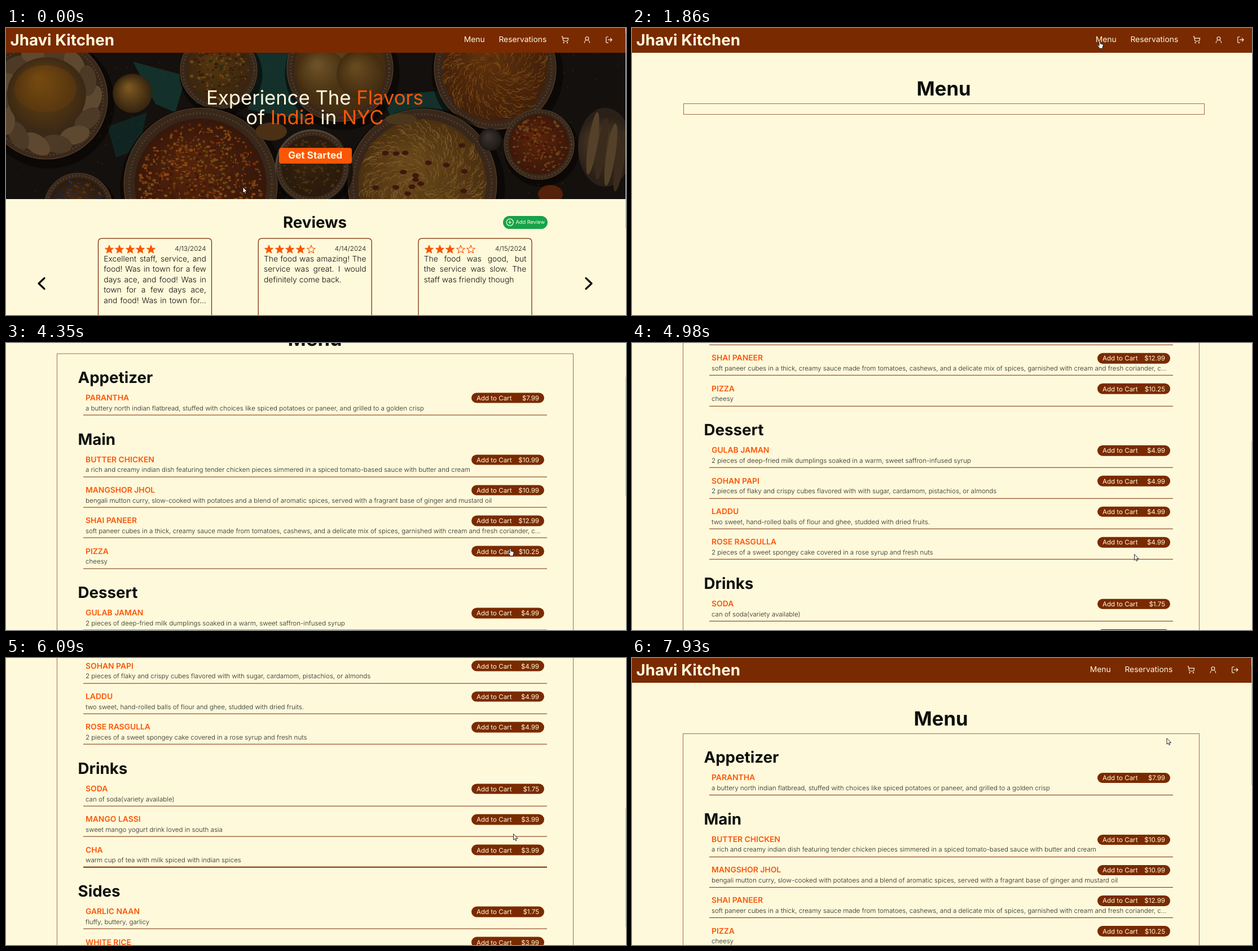
Write an HTML page with a canvas that moves like this. It is 1099 px wide and 510 px high and loops after 8000 ms.

```html
<!DOCTYPE html>
<html lang="en">
<head>
<meta charset="utf-8">
<title>Restaurant menu</title>
<style>
  :root { --cream: #fff9db; --brown: #7a2a00; --orange: #fb5607; --ink: #0c0f0a; --soft: #262924; }
  html, body { margin: 0; width: 100%; height: 100%; overflow: hidden; background: var(--cream); }
  #stage { position: relative; width: 1099px; height: 510px; overflow: hidden; font-family: Inter, sans-serif; color: var(--ink); text-rendering: geometricPrecision; }
  #stage div, #stage p, #stage svg, canvas { position: absolute; }
  svg { overflow: visible; fill: none; stroke-linecap: round; stroke-linejoin: round; }
  .page { inset: 0; }
  .t { white-space: pre; line-height: 40px; }
  .mid { transform: translateX(-50%); }
  .end { transform: translateX(-100%); }
  .bar { left: 0; top: 0; height: 44px; background: var(--brown); }
  .frame { top: 134px; border: 1px solid #7a2a00b0; box-sizing: border-box; }
  .rule { left: 137px; width: 821.5px; height: 1.3px; background: var(--brown); }
  .pill { left: 824.5px; width: 129.5px; height: 18.5px; border-radius: 10px; background: var(--brown); }
  .review { margin: 0; top: 401.8px; width: 181.5px; font-size: 13.86px; font-weight: 300; line-height: 18.48px; text-align-last: justify; white-space: nowrap; }
  .review span { display: block; }
  .review .left { text-align-last: left; }
  #track { left: 1098px; top: 0; width: 1px; height: 510px; background: #f1f1f1; }
  #thumb { left: 0; top: 0; width: 1px; background: #c1c1c1; }
</style>
</head>
<body>
<div id="stage">
  <div class="page" id="home"></div>
  <div class="page" id="loading"></div>
  <div class="page" id="menu"></div>
  <div id="track"><div id="thumb"></div></div>
  <svg id="cursor" width="1" height="1" style="left:0;top:0" stroke="#111" stroke-width=".9">
    <path id="arrow" fill="#fff" d="M0 0V10.2L2.4 8.1 4 11.6 5.6 10.9 4.1 7.5H7.2Z"/>
    <path id="hand" fill="#fff" d="M-1.1 1Q0-.8 1.1 1V5L2.7 5.2 4.2 5.6 5.6 6.2Q6.3 6.6 6.2 8L5 11.5V13.5H-.8V12L-3.6 8.4Q-3.7 6.9-2.3 7.3L-1.1 8.6Z"/>
  </svg>
</div>
<script>
const $ = id => document.getElementById(id);
const CREAM = 'var(--cream)', ORANGE = 'var(--orange)', INK = 'var(--ink)', SOFT = 'var(--soft)';

// y is the middle of the capital letters
const text = (x, y, size, weight, color, str, align = '') =>
  `<div class="t ${align}" style="left:${x}px;top:${y - 20}px;font-size:${size}px;font-weight:${weight};color:${color}">${str}</div>`;

const icon = (x, y, size, body, color = CREAM, width = 2) =>
  `<svg style="left:${x - size / 2}px;top:${y - size / 2}px" width="${size}" height="${size}" viewBox="0 0 24 24" stroke="${color}" stroke-width="${width}">${body}</svg>`;

const CART = '<circle cx="8" cy="21" r="1"/><circle cx="19" cy="21" r="1"/><path d="M2 2h2l2.7 12.4a2 2 0 0 0 2 1.6h9.7a2 2 0 0 0 2-1.6L22 7H5.1"/>';
const USER = '<circle cx="12" cy="8" r="5"/><path d="M20 21a8 8 0 0 0-16 0"/>';
const EXIT = '<path d="M9 21H5a2 2 0 0 1-2-2V5a2 2 0 0 1 2-2h4M16 17l5-5-5-5M21 12H9"/>';
const PLUS = '<circle cx="12" cy="12" r="10"/><path d="M8 12h8M12 8v8"/>';

const header = (width, shift) =>
  `<div class="bar" style="width:${width}px"></div>` +
  text(7.5, 21, 27.7, 700, CREAM, 'Jhavi Kitchen') +
  text(811.7 + shift, 20.5, 13.86, 400, CREAM, 'Menu') +
  text(873.4 + shift, 20.5, 13.86, 400, CREAM, 'Reservations') +
  [CART, USER, EXIT].map((body, i) => icon(990.5 + 39 * i + shift, 20.5, 13.9, body)).join('');

// Home page
const starPoints = Array.from({ length: 10 }, (_, i) => {
  const r = i % 2 ? 5 : 11.5, a = i * Math.PI / 5;
  return `${(12 + r * Math.sin(a)).toFixed(1)},${(13 - r * Math.cos(a)).toFixed(1)}`;
}).join(' ');

const card = (x, stars, date, lines, lastClass) =>
  `<svg style="left:0;top:0" width="1" height="1"><rect x="${x + .5}" y="373.8" width="201" height="180" rx="6" stroke="var(--brown)" stroke-width="1.25"/></svg>` +
  Array.from({ length: 5 }, (_, i) => icon(x + 19.5 + 18.6 * i, 392.7, 16,
    `<polygon points="${starPoints}" fill="${i < stars ? ORANGE : 'none'}"/>`, ORANGE, 1.7)).join('') +
  text(x + 191.5, 391.7, 11.55, 300, INK, date, 'end') +
  `<p class="review" style="left:${x + 10.3}px">` +
  lines.map((line, i) => `<span class="${i === lines.length - 1 ? lastClass : ''}">${line}</span>`).join('') + '</p>';

const accent = str => `<span style="color:${ORANGE}">${str}</span>`;

$('home').innerHTML = header(1098, 0) +
  '<canvas id="hero" width="1098" height="260" style="left:0;top:44px"></canvas>' +
  text(547.5, 123.7, 34.65, 400, CREAM, `Experience The ${accent('Flavors')}`, 'mid') +
  text(547.5, 158.5, 34.65, 400, CREAM, `of ${accent('India')} in ${accent('NYC')}`, 'mid') +
  `<div style="left:483.5px;top:213px;width:129.5px;height:28px;border-radius:4px;background:${ORANGE}"></div>` +
  text(548, 227, 17.3, 700, CREAM, 'Get Started', 'mid') +
  text(547.5, 345, 27.7, 700, INK, 'Reviews', 'mid') +
  '<div style="left:881px;top:334px;width:79px;height:23px;border-radius:12px;background:#16a34a"></div>' +
  icon(893, 345.5, 14.5, PLUS) + text(903.5, 345.5, 9.24, 400, CREAM, 'Add Review') +
  card(163, 5, '4/13/2024', ['Excellent staff, service, and', 'food! Was in town for a few', 'days ace, and food! Was in',
    'town for a few days ace,', 'and food! Was in town for…'], '') +
  card(446.7, 4, '4/14/2024', ['The food was amazing! The', 'service was great. I would', 'definitely come back.'], 'left') +
  card(730.5, 3, '4/15/2024', ['The food was good, but', 'the service was slow. The', 'staff was friendly though'], 'left') +
  icon(62.5, 454, 24, '<path d="M17 2.5L7 12 17 21.5"/>', INK, 3.3) +
  icon(1033, 454, 24, '<path d="M7 2.5L17 12 7 21.5"/>', INK, 3.3);

function paintHero() {
  const c = $('hero').getContext('2d');
  let seed = 7;
  const rnd = () => (seed = seed * 16807 % 2147483647) / 2147483647;
  const disc = (x, y, r, color, ry = r, turn = 0) => {
    c.fillStyle = color;
    c.beginPath();
    c.ellipse(x, y, r, ry, turn, 0, 7);
    c.fill();
  };
  const glow = (x, y, r, inner, outer) => {
    const g = c.createRadialGradient(x - r * .2, y - r * .3, r * .1, x, y, r);
    g.addColorStop(0, inner);
    g.addColorStop(1, outer);
    return g;
  };
  const patch = (color, ...p) => {
    c.fillStyle = color;
    c.beginPath();
    for (let i = 0; i < p.length; i += 2) c.lineTo(p[i], p[i + 1]);
    c.fill();
  };
  const folds = (x, y, r, count) => {
    for (let i = 0; i < count; i++) {
      const a = i * 6.283 / count;
      disc(x + r * Math.cos(a), y + r * Math.sin(a), r * .2, i % 2 ? '#4d3a26' : '#5e4930', r * .34, a + .4);
    }
  };
  const bowl = (x, y, r, inner, outer, specks = [], strands = false) => {
    disc(x + 4, y + 8, r * 1.08, 'rgba(5,4,3,.6)');
    disc(x, y, r, glow(x, y, r, '#2a1d14', '#3a281b'));
    c.strokeStyle = '#53402b';
    c.lineWidth = 1.2;
    c.beginPath();
    c.arc(x, y, r, 0, 7);
    c.stroke();
    c.setLineDash([2, 4]);
    c.lineWidth = 3;
    c.beginPath();
    c.arc(x, y, r * .93, 0, 7);
    c.stroke();
    c.setLineDash([]);
    disc(x, y, r * .86, glow(x, y, r * .86, inner, outer));
    for (let i = 0; specks.length && i < r * r / 20; i++) {
      const a = rnd() * 6.3, d = Math.sqrt(rnd()) * r * .8;
      const px = x + d * Math.cos(a), py = y + d * Math.sin(a), color = specks[i % specks.length];
      if (strands) {
        c.strokeStyle = color;
        c.lineWidth = 1;
        c.beginPath();
        c.arc(px, py, 4 + rnd() * 7, a, a + 1.8);
        c.stroke();
      } else disc(px, py, 1 + rnd() * 2.6, color, 1 + rnd() * 1.8);
    }
  };
  c.fillStyle = '#14100d';
  c.fillRect(0, 0, 1098, 260);
  c.translate(0, -44);
  patch('#14302b', 225, 60, 320, 85, 300, 150, 265, 135);
  patch('#14302b', 430, 44, 510, 44, 535, 165, 430, 145);
  patch('#14302b', 665, 120, 790, 110, 780, 180, 690, 175);
  patch('#102521', 180, 175, 250, 150, 235, 215, 195, 230);
  bowl(72, 125, 108, '#4c3215', '#34261a');
  folds(72, 128, 80, 14);
  disc(72, 118, 70, glow(72, 118, 70, '#68430f', '#3a2815'), 66);
  disc(70, 108, 55, glow(70, 108, 55, '#73490f', '#54340f'), 42);
  disc(224, 116, 35, glow(224, 116, 35, '#7a5520', '#33230f'));
  bowl(377, 75, 68, '#54350f', '#3a2410', ['#6b4715', '#3a1c0a', '#2f2d12']);
  bowl(592, 72, 94, '#5d4119', '#422b11');
  disc(560, 78, 44, glow(560, 78, 44, '#6c5028', '#46300f'), 40);
  disc(628, 82, 42, glow(628, 82, 42, '#66491f', '#422c10'), 44);
  bowl(867, 72, 108, '#5d310c', '#40200a', ['#754110', '#54260a', '#85551a'], true);
  bowl(345, 278, 136, '#52230a', '#35170b', ['#713209', '#6b4617', '#421508', '#8a4712']);
  bowl(738, 276, 132, '#674719', '#4a3010', ['#795726', '#856332', '#5a3212'], true);
  for (let i = 0; i < 16; i++) disc(655 + rnd() * 165, 205 + rnd() * 90, 6, '#3f160d', 4);
  disc(543, 246, 66, '#4b443a');
  bowl(543, 246, 63, '#39240f', '#281a0d', ['#49300f', '#2d1c0b']);
  bowl(945, 207, 62, '#5a240b', '#3b180a', ['#733411', '#451409', '#67461a']);
  bowl(128, 318, 60, '#40270f', '#2a1b10', ['#553311', '#1f2346']);
  disc(858, 198, 20, glow(858, 198, 20, '#3b342e', '#1d1916'));
  disc(700, 162, 28, '#4a371b', 10);
  disc(470, 184, 28, '#4b3015', 16);
  disc(1062, 212, 48, glow(1062, 212, 55, '#4c3a25', '#2a2018'), 70);
  for (let i = 0; i < 4; i++) disc(1040 + 16 * i, 205 + 10 * i, 8, i % 2 ? '#3a2b1c' : '#554129', 56, .15);
  disc(965, 295, 22, '#54210a', 16);
  for (let i = 0; i < 140; i++) disc(rnd() * 1098, 44 + rnd() * 260, 1.5, 'rgba(90,65,35,.35)', 1);
}
paintHero();

// Menu page
const sections = [
  ['Appetizer', ['PARANTHA', '7.99', 'a buttery north indian flatbread, stuffed with choices like spiced potatoes or paneer, and grilled to a golden crisp']],
  ['Main',
    ['BUTTER CHICKEN', '10.99', 'a rich and creamy indian dish featuring tender chicken pieces simmered in a spiced tomato-based sauce with butter and cream'],
    ['MANGSHOR JHOL', '10.99', 'bengali mutton curry, slow-cooked with potatoes and a blend of aromatic spices, served with a fragrant base of ginger and mustard oil'],
    ['SHAI PANEER', '12.99', 'soft paneer cubes in a thick, creamy sauce made from tomatoes, cashews, and a delicate mix of spices, garnished with cream and fresh coriander, c…'],
    ['PIZZA', '10.25', 'cheesy']],
  ['Dessert',
    ['GULAB JAMAN', '4.99', '2 pieces of deep-fried milk dumplings soaked in a warm, sweet saffron-infused syrup'],
    ['SOHAN PAPI', '4.99', '2 pieces of flaky and crispy cubes flavored with with sugar, cardamom, pistachios, or almonds'],
    ['LADDU', '4.99', 'two sweet, hand-rolled balls of flour and ghee, studded with dried fruits.'],
    ['ROSE RASGULLA', '4.99', '2 pieces of a sweet spongey cake covered in a rose syrup and fresh nuts']],
  ['Drinks',
    ['SODA', '1.75', 'can of soda(variety available)'],
    ['MANGO LASSI', '3.99', 'sweet mango yogurt drink loved in south asia'],
    ['CHA', '3.99', 'warm cup of tea with milk spiced with indian spices']],
  ['Sides',
    ['GARLIC NAAN', '1.75', 'fluffy, buttery, garlicy'],
    ['WHITE RICE', '3.99', 'steamed basmati rice']],
];

const menuTop = (width, shift, frameLeft, frameWidth, frameHeight) => header(width, shift) +
  text(547.5 + shift / 2, 107.5, 34.65, 700, INK, 'Menu', 'mid') +
  `<div class="frame" style="left:${frameLeft}px;width:${frameWidth}px;height:${frameHeight}px"></div>`;

const buttonRows = [];
const item = (y, [name, price, about]) => {
  buttonRows.push(y);
  return text(141, y, 13.86, 600, ORANGE, name) +
    text(141, y + 17.6, 11.55, 300, SOFT, about) +
    `<div class="pill" style="top:${y - 9.2}px"></div>` +
    text(834, y, 11.55, 400, CREAM, 'Add to Cart') +
    text(945, y, 11.55, 400, CREAM, '$' + price, 'end') +
    `<div class="rule" style="top:${y + 29.9}px"></div>`;
};

let y = 176;
$('loading').innerHTML = menuTop(1099, 10, 90.5, 924.5, 20);
$('menu').innerHTML = menuTop(1098, 0, 90, 915.5, 1060) + sections.map(([title, ...items]) => {
  const html = text(127.5, y, 27.7, 700, INK, title) + items.map((it, i) => item(y + 37 + 54.3 * i, it)).join('');
  y += 109.7 + 54.3 * (items.length - 1);
  return html;
}).join('');

// Motion: the picture only changes in bursts of evenly spaced steps
const LOOP = 8000, NOTCH = 57.75;
const bursts = [[440, 1460, 9], [1860, 2790, 8], [2940, 3930, 8], [4080, 5100, 9], [5250, 5400, 2],
  [5670, 6630, 8], [6780, 7810, 8], [7930, 7930, 1]];
const pointer = [[0, 420, 283], [570, 380, 270], [700, 480, 235], [1000, 760, 120], [1200, 926, 60], [1460, 829, 23],
  [2010, 829, 23], [2400, 850, 85], [2790, 880, 210], [2940, 885, 228], [3223, 898, 322], [3930, 894, 365],
  [4340, 894, 365], [4972, 890.5, 376], [5100, 889, 360], [5400, 876, 190], [5670, 880, 205], [6081, 899.5, 313],
  [6630, 905, 330], [7200, 935, 310], [7810, 968, 267], [7930, 948, 143]];
const wheel = [[3950, 0], [4335, 2], [4972, 7], [5532, 7], [6081, 11], [6219, 11.7], [6630, 11.7], [7520, 0]];

function heldTime(t) {
  let held = 0;
  for (const [from, to, count] of bursts) {
    if (t < from) break;
    const gap = (to - from) / (count - 1) || 1;
    held = from + gap * Math.min(count - 1, Math.floor((t - from) / gap + .12));
  }
  return held;
}

function at(knots, t) {
  const i = knots.findIndex(k => k[0] > t);
  if (i < 0) return knots[knots.length - 1].slice(1);
  if (i === 0) return knots[0].slice(1);
  const a = knots[i - 1], b = knots[i], p = (t - a[0]) / (b[0] - a[0]);
  return a.slice(1).map((v, j) => v + (b[j + 1] - v) * p);
}

function draw(ms) {
  const t = heldTime(ms);
  const page = t < 1860 ? 'home' : t < 1980 ? 'loading' : 'menu';
  for (const id of ['home', 'loading', 'menu']) $(id).style.visibility = id === page ? 'visible' : 'hidden';

  const scroll = at(wheel, t)[0] * NOTCH;
  $('menu').style.transform = `translateY(${-scroll}px)`;
  $('track').style.display = page === 'loading' ? 'none' : '';
  const end = page === 'home' ? 356 : 226 + .396 * scroll;
  $('thumb').style.top = (page === 'home' ? 10 : end - 212) + 'px';
  $('thumb').style.height = (page === 'home' ? 346 : 212) + 'px';

  const [px, py] = at(pointer, t);
  const onNav = scroll === 0 && px > 811 && px < 868 && py > 10 && py < 32;
  const onButton = page === 'menu' && px > 825 && px < 954 && buttonRows.some(row => Math.abs(row - scroll - py) < 9);
  const hand = onNav || onButton;
  $('hand').style.display = hand ? '' : 'none';
  $('arrow').style.display = hand ? 'none' : '';
  $('cursor').style.transform = `translate(${px}px,${py}px)`;
}

const start = performance.now();
(function tick() {
  draw((performance.now() - start) % LOOP);
  requestAnimationFrame(tick);
})();
</script>
</body>
</html>
```
